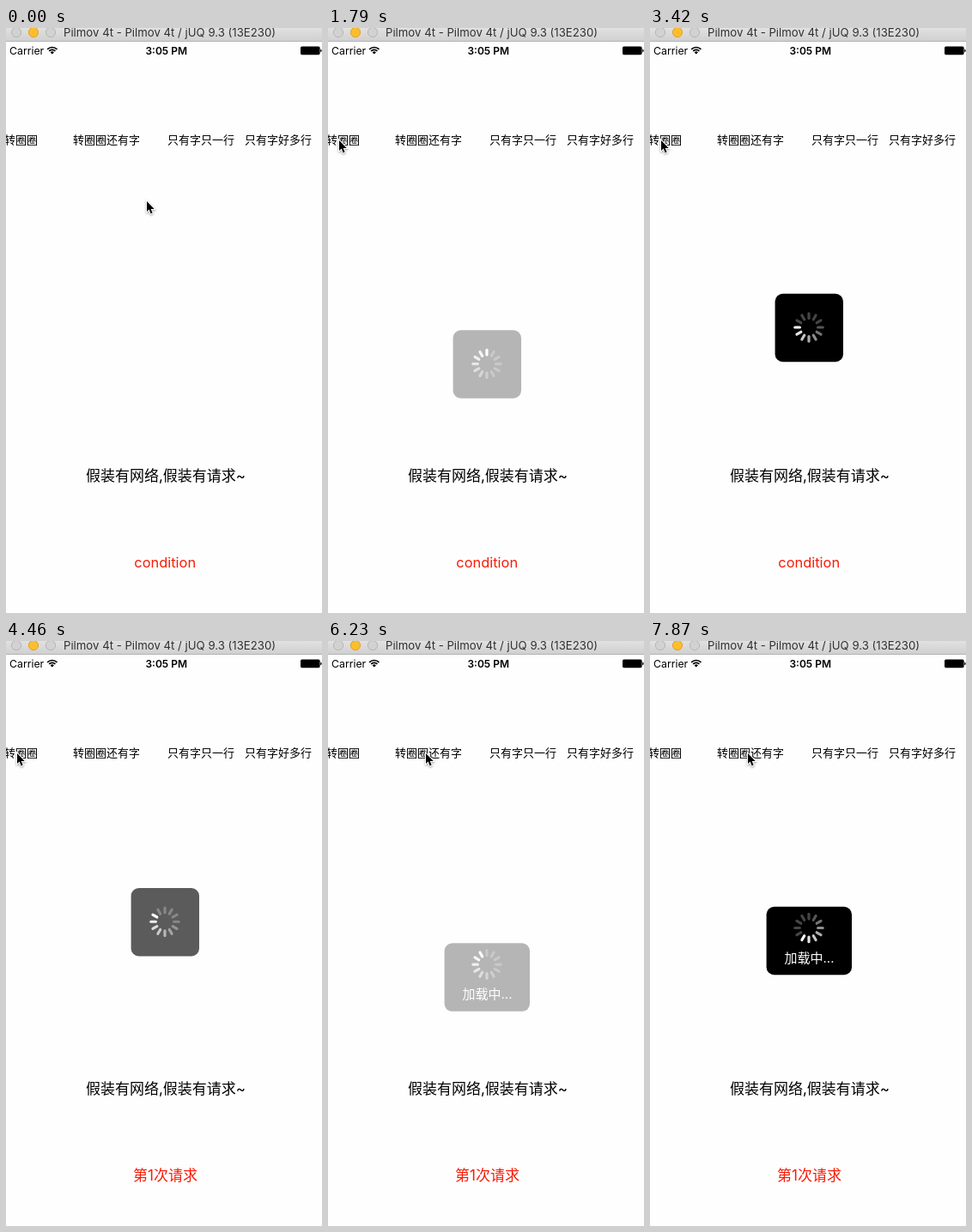
These frames come from a looping animation (368x682 px, 8000 ms). An HTML page with a canvas:

```html
<!DOCTYPE html>
<html lang="zh">
<head>
<meta charset="utf-8">
<title>Loading HUD demo</title>
<style>
  html, body { margin: 0; width: 100%; height: 100%; overflow: hidden; background: #fefefe; }
  canvas { display: block; width: 368px; height: 682px; }
</style>
</head>
<body>
<canvas id="stage"></canvas>
<script>
const W = 368, H = 682, LOOP = 8000, STEP = 147.9, FIRST = 170;
const FONT = 'Inter, "Noto Sans CJK SC", "Noto Sans CJK", sans-serif';
const RED = '#f91a06';
const canvas = document.getElementById('stage');
const ctx = canvas.getContext('2d');
const dpr = window.devicePixelRatio || 1;
canvas.width = W * dpr;
canvas.height = H * dpr;

const HUDS = [
  { x: 145.6, w: 79.4, spinY: 349, show: 1542, hide: 4337, phase: 4.7 },
  { x: 135.6, w: 99.4, spinY: 334.5, show: 6127, hide: Infinity, phase: 8.9, label: '加载中...' }
];
const FADE = 300, TRAVEL = 60;

const MOVES = [
  { start: 22, end: 1057, from: [164, 202], to: [13, 131] },
  { start: 4607, end: 5346, from: [13, 131], to: [114, 131] }
];

function ease(t, start, length) {
  const p = Math.min(1, Math.max(0, (t - start) / length));
  return p * p * (3 - 2 * p);
}

function text(str, x, y, size, color = '#000', opts = {}) {
  ctx.font = `${opts.weight || 400} ${size}px ${FONT}`;
  ctx.textAlign = opts.align || 'left';
  ctx.textBaseline = 'alphabetic';
  ctx.fillStyle = color;
  ctx.fillText(str, x, y);
}

function roundRect(x, y, w, h, r) {
  ctx.beginPath();
  ctx.roundRect(x, y, w, h, r);
}

function titleBar() {
  const shade = ctx.createLinearGradient(0, 0, 0, 15);
  shade.addColorStop(0, '#e2e1e2');
  shade.addColorStop(1, '#d1d0d1');
  ctx.fillStyle = shade;
  ctx.fillRect(0, 0, W, 15);
  ctx.fillStyle = '#b4b3b4';
  ctx.fillRect(0, 15, W, 1);
  const lights = [[12, '#d3d2d3', '#b6b5b6'], [32, '#fdbe2c', '#dfa02c'], [52, '#d3d2d3', '#b6b5b6']];
  for (const [x, fill, rim] of lights) {
    ctx.beginPath();
    ctx.arc(x, 5, 5.6, 0, Math.PI * 2);
    ctx.fillStyle = fill;
    ctx.fill();
    ctx.strokeStyle = rim;
    ctx.lineWidth = 1;
    ctx.stroke();
  }
  text('Pilmov 4t - Pilmov 4t / jUQ 9.3 (13E230)', 67, 10, 13.2, '#303030');
}

function wifi(x, y) {
  const a = -Math.PI * 0.75, b = -Math.PI * 0.25;
  ctx.strokeStyle = ctx.fillStyle = '#000';
  ctx.lineWidth = 1.7;
  for (const r of [8, 5.1]) {
    ctx.beginPath();
    ctx.arc(x, y, r, a, b);
    ctx.stroke();
  }
  ctx.beginPath();
  ctx.moveTo(x, y);
  ctx.arc(x, y, 3, a, b);
  ctx.fill();
}

function battery() {
  ctx.fillStyle = '#000';
  roundRect(343, 21.6, 22.6, 9.6, 1.6);
  ctx.fill();
  roundRect(366.2, 24.8, 1.4, 3.4, [0, 1.4, 1.4, 0]);
  ctx.fill();
}

function statusBar() {
  text('Carrier', 4, 31, 12.3);
  wifi(53.8, 30.5);
  text('3:05 PM', 186.7, 31, 12, '#000', { weight: 600, align: 'center' });
  battery();
}

function labels(t) {
  text('转圈圈', -2, 134.5, 13);
  text('转圈圈还有字', 78, 134.5, 13);
  text('只有字只一行', 188, 134.5, 13);
  text('只有字好多行', 278, 134.5, 13);
  text('假装有网络,假装有请求~', 186, 528, 17, '#000', { align: 'center' });
  if (t < 3860) text('condition', 185.2, 628.5, 16.4, RED, { align: 'center' });
  else text('第1次请求', 185.5, 628.5, 17, RED, { align: 'center' });
}

function spinner(x, y, lead) {
  ctx.save();
  ctx.translate(x, y);
  ctx.lineCap = 'round';
  ctx.lineWidth = 3.2;
  for (let i = 0; i < 12; i++) {
    const age = (lead - i + 24) % 12;
    const glow = Math.max(0.27, 1 - age * 0.11);
    ctx.strokeStyle = `rgba(255,255,255,${glow})`;
    ctx.beginPath();
    ctx.moveTo(0, -10.6);
    ctx.lineTo(0, -16.2);
    ctx.stroke();
    ctx.rotate(Math.PI / 6);
  }
  ctx.restore();
}

// Rises into place while fading in, keeps rising while fading out.
function hud(h, t) {
  const shown = ease(t, h.show, FADE);
  const hidden = ease(t, h.hide, FADE);
  const alpha = shown - hidden;
  if (alpha <= 0) return;
  ctx.save();
  ctx.translate(0, TRAVEL * (1 - shown - hidden));
  ctx.fillStyle = `rgba(0,0,0,${alpha})`;
  roundRect(h.x, 309.8, h.w, 79.4, 9);
  ctx.fill();
  // White parts stay white: the panel fades as one group over a white page.
  const lead = Math.floor(t / 1000 * 12 + h.phase) % 12;
  spinner(185, h.spinY, lead);
  if (h.label) text(h.label, 185.5, 374.5, 15, '#fff', { align: 'center' });
  ctx.restore();
}

function cursorAt(t) {
  const m = t < MOVES[1].start ? MOVES[0] : MOVES[1];
  const p = ease(t, m.start, m.end - m.start);
  return m.from.map((v, i) => v + (m.to[i] - v) * p);
}

function cursor(t) {
  const [x, y] = cursorAt(t);
  const shape = new Path2D('M0 0V12L2.7 9.6L4.6 14.4L6.6 13.6L4.7 8.9H8.7Z');
  ctx.save();
  ctx.translate(x, y);
  ctx.lineJoin = 'miter';
  ctx.lineWidth = 2;
  ctx.strokeStyle = '#fff';
  ctx.shadowColor = 'rgba(0,0,0,0.4)';
  ctx.shadowBlur = 2.5 * dpr;
  ctx.shadowOffsetY = dpr;
  ctx.stroke(shape);
  ctx.shadowColor = 'transparent';
  ctx.fillStyle = '#000';
  ctx.fill(shape);
  ctx.restore();
}

function draw(now) {
  // The screen refreshes in fixed steps, so the pose is held between them.
  const tick = Math.floor((now % LOOP - FIRST + 6) / STEP);
  const t = FIRST + tick * STEP;
  ctx.setTransform(dpr, 0, 0, dpr, 0, 0);
  ctx.fillStyle = '#fefefe';
  ctx.fillRect(0, 0, W, H);
  titleBar();
  statusBar();
  labels(t);
  for (const h of HUDS) hud(h, t);
  cursor(t);
}

let begin;
function loop(now) {
  begin ??= now;
  draw(now - begin);
  requestAnimationFrame(loop);
}
draw(0);
requestAnimationFrame(loop);
</script>
</body>
</html>
```
